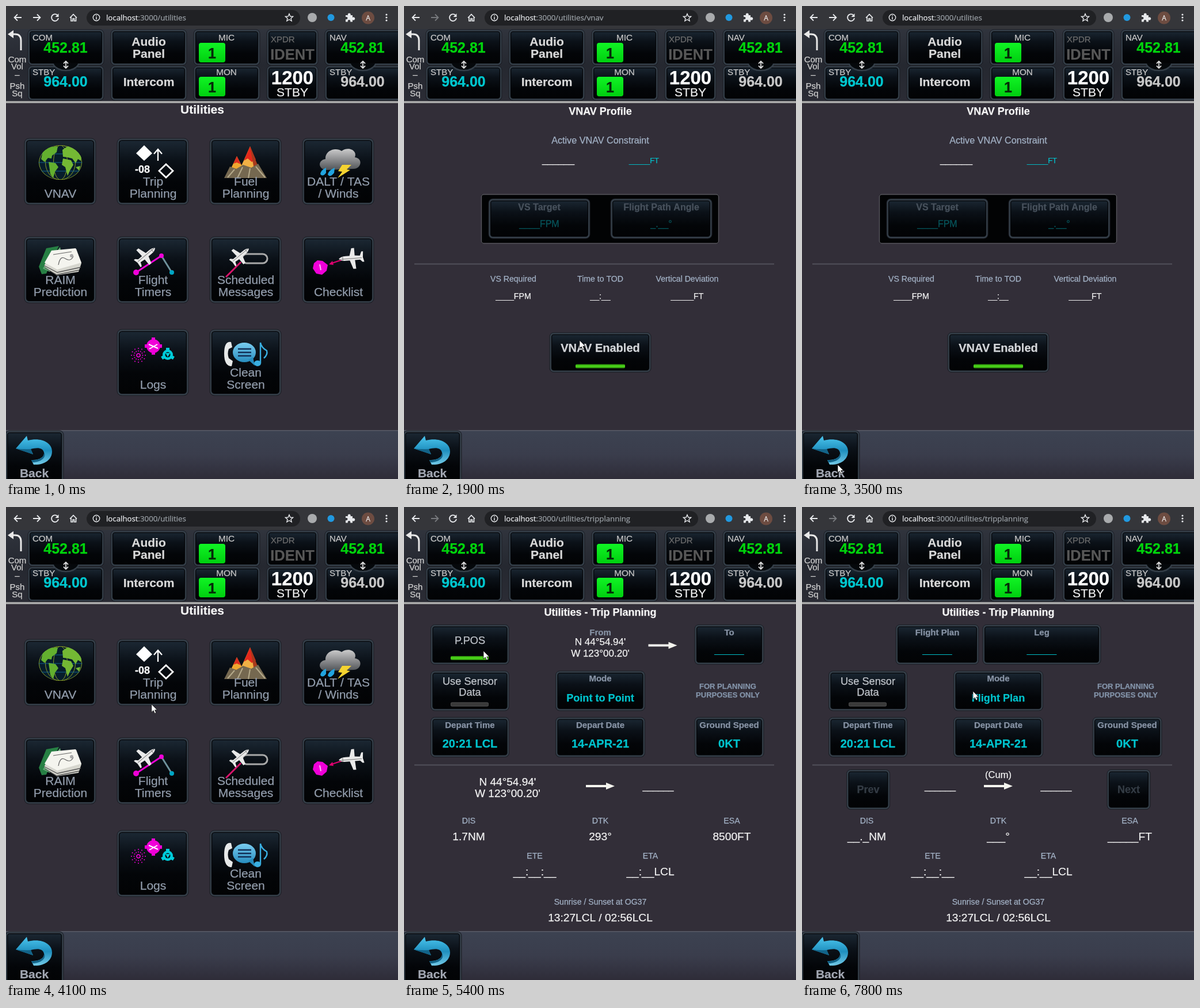
An HTML page with a canvas that plays this animation: 681 by 822 pixels, repeating every 8 s.

```html
<!DOCTYPE html>
<html lang="en">
<head>
<meta charset="utf-8">
<title>Avionics touch panel</title>
<style>
  html, body { margin: 0; width: 100%; height: 100%; overflow: hidden; background: #302c36; }
  canvas { display: block; width: 100%; height: 100%; }
</style>
</head>
<body>
<canvas id="stage" width="681" height="822"></canvas>
<script>
const c = document.getElementById('stage').getContext('2d');
const LOOP = 8000, TICK = 100;
const SANS = '"Liberation Sans", Arial, sans-serif', UI = '"Open Sans", sans-serif';
const CYAN = '#00c3cd', LABEL = '#8793a5', SOFT = '#a3b2c6', WHITE = '#f4f4f4', MAGENTA = '#f000d8';

// ---------- drawing helpers ----------
function text(s, x, y, size, color, weight = '', align = 'center', family = SANS) {
  c.font = `${weight} ${size}px ${family}`;
  c.fillStyle = c.strokeStyle = color;
  c.textAlign = align;
  c.fillText(s, x, y);
  // A hairline gives the glyphs a little more weight.
  c.lineWidth = .25;
  c.strokeText(s, x, y);
}
const bold = (s, x, y, size, color) => text(s, x, y, size, color, 'bold');

function rect(x, y, w, h, fill, r = 0) {
  c.beginPath();
  c.roundRect(x, y, w, h, r);
  c.fillStyle = fill;
  c.fill();
}
function outline(x, y, w, h, color, width, r) {
  c.beginPath();
  c.roundRect(x, y, w, h, r);
  c.strokeStyle = color;
  c.lineWidth = width;
  c.stroke();
}
function shape(d, fill) {
  c.fillStyle = fill;
  c.fill(new Path2D(d));
}
function line(d, color, width = 2) {
  c.strokeStyle = color;
  c.lineWidth = width;
  c.stroke(new Path2D(d));
}
function oval(x, y, rx, ry, fill) {
  c.beginPath();
  c.ellipse(x, y, rx, ry, 0, 0, 7);
  c.fillStyle = fill;
  c.fill();
}
const dot = (x, y, r, fill) => oval(x, y, r, r, fill);

function fade(y0, y1, ...colors) {
  const g = c.createLinearGradient(0, y0, 0, y1);
  colors.forEach((color, i) => g.addColorStop(i / (colors.length - 1), color));
  return g;
}
function button(x, y, w, h, pressed = false, r = 7) {
  const fill = pressed ? fade(y, y + h, '#3f7db4', '#15528f', '#0f4680')
                       : fade(y, y + h, '#1d2a36', '#0b1118', '#030508', '#020304');
  rect(x, y, w, h, fill, r);
  if (!pressed) outline(x + 3.5, y + 3.5, w - 7, h - 7, '#05070a', 1.5, r - 3);
  outline(x + 1.5, y + 1.5, w - 3, h - 3, pressed ? '#f2f4f6' : '#343e48', 2.8, r - 1);
  if (!pressed) outline(x, y, w, h, '#1c1e25', 1, r);
}
function toggleBar(x, y, w, on) {
  rect(x, y, w, 7, on ? fade(y, y + 7, '#2c8a0c', '#50e01c', '#2c8a0c') : '#393939', 2);
  if (!on) outline(x + .5, y + .5, w - 1, 6, '#4b4b4b', 1, 2);
}
function plane(x, y, angle, scale = 1) {
  c.save();
  c.translate(x, y);
  c.rotate(angle);
  c.scale(scale, scale);
  shape('M-22 0Q-18-4-10-4L-3-4 1-17 6-17 6-4 15-3 18-10 21-10 20 0 22 8 19 8 15 4 6 4 7 19 2 19-3 4-10 4Q-18 4-22 0Z', '#e9e9e9');
  line('M-20 1H18M-15-3V3', '#777', 1);
  c.restore();
}

// ---------- browser chrome ----------
function browserBar(path) {
  rect(0, 0, 681, 40, '#35363a');
  rect(140, 7, 371, 27, '#202124', 13.5);
  const ink = '#e8eaed';
  line('M27 20H15M20 14.5 14.5 20 20 25.5', ink, 1.8);
  line('M47 20H59M54 14.5 59.5 20 54 25.5', path ? '#77797d' : ink, 1.8);
  line('M89.5 16A6 6 0 1 0 91 21', ink, 1.8);
  shape('M91.5 13V19H85.5Z', ink);
  line('M111 20.5 117 14.5 123 20.5M113 19V26H116V22H118.5V26H121.5V19', ink, 1.7);
  c.beginPath(); c.arc(157, 20, 5.7, 0, 7); c.lineWidth = 1.4; c.stroke();
  line('M157 19V23.5M157 16.3V17.8', ink, 1.5);
  text('localhost', 174, 25, 13.25, ink, '', 'left', UI);
  const hostWidth = c.measureText('localhost').width;
  text(':3000/utilities' + path, 174 + hostWidth, 25, 13.25, '#9aa0a6', '', 'left', UI);
  line('M492 13.5 493.9 18 498.6 18.4 495 21.5 496.1 26 492 23.5 487.9 26 489 21.5 485.4 18.4 490.1 18Z', ink, 1.4);
  dot(532, 20, 8, '#a9abad');
  dot(564.5, 20, 6, '#2199e0');
  shape('M590 16H594A2.5 2.5 0 1 1 598.5 16H602V20A2.6 2.6 0 1 1 602 24V27.5H598A2.3 2.3 0 1 0 594 27.5H590V23A2.3 2.3 0 1 0 590 19Z', ink);
  dot(629, 20.5, 11, '#6d4c41');
  text('A', 629, 25, 12, '#eee', '', 'center', UI);
  for (const y of [15, 20, 25]) dot(661, y, 1.6, ink);
}

// ---------- radio strip ----------
function radio(x, w, name, standbyColor) {
  const mid = x + 66;
  button(x, 41, w, 62);
  button(x, 104, w, 60);
  shape(`M${mid - 21} 100Q${mid - 17} 112 ${mid} 112T${mid + 21} 100Z`, '#05080b');
  line(`M${mid - 22} 102Q${mid - 15} 112 ${mid} 112Q${mid + 15} 112 ${mid + 22} 102`, '#343e48', 2.5);
  line(`M${mid} 97V107M${mid - 4} 100 ${mid} 96 ${mid + 4} 100M${mid - 4} 104 ${mid} 108 ${mid + 4} 104`, '#ddd', 1.8);
  text(name, x + 8, 60, 15, '#c8c8c8', '', 'left');
  text('STBY', x + 8, 120, 15, '#c8c8c8', '', 'left');
  bold('452.81', mid - .5, 81, 25, '#00d40c');
  bold('964.00', mid - .5, 140, 25, standbyColor);
}
function monitor(name, y, h, labelY, lampY) {
  button(326, y, 115, h);
  text(name, 383, labelY, 15.3, '#c8c8c8');
  rect(335, lampY, 46, 34, fade(lampY, lampY + 34, '#10f424', '#00cf10'), 4);
  bold('1', 358, lampY + 27, 25, '#062a08');
}
function radioStrip() {
  rect(0, 40, 681, 126, fade(40, 166, '#30343d', '#252830', '#2b2c35'));
  line('M26 77V60Q26 49 16 49H10', '#e8e8e8', 3);
  shape('M3 49 13 42V56Z', '#e8e8e8');
  [['Com', 98], ['Vol', 110], ['–', 124], ['Psh', 144], ['Sq', 156.5]]
    .forEach(([s, y]) => text(s, 19.5, y, 15, '#d0d0d0'));
  radio(38, 132, 'COM', '#00c8d0');
  radio(554, 140, 'NAV', '#c8c8c8');
  button(182, 41, 132, 62);
  button(182, 104, 132, 60);
  bold('Audio', 248, 69, 21, '#d8d8d8');
  bold('Panel', 248, 90, 21, '#d8d8d8');
  bold('Intercom', 248, 139, 21, '#d8d8d8');
  monitor('MIC', 41, 62, 60, 64);
  monitor('MON', 104, 60, 120, 123);
  button(453, 41, 89, 62);
  button(453, 104, 89, 60);
  text('XPDR', 460, 63, 15, '#6c6c6c', '', 'left');
  bold('IDENT', 497.5, 93, 25.5, '#575757');
  bold('1200', 497.5, 136, 33, '#fff');
  text('STBY', 497.5, 157, 21, '#f0f0f0');
  rect(0, 165, 681, 4, fade(165, 169, '#777', '#c4c4c4', '#777'));
}

// ---------- utility icons ----------
const icons = {
  VNAV() {
    c.save();
    c.beginPath(); c.ellipse(94.5, 272, 38, 30, 0, 0, 7); c.clip();
    rect(56, 241, 78, 62, '#071d2b');
    for (const r of [12, 26, 37]) {
      c.beginPath(); c.ellipse(94.5, 272, r, 30, 0, 0, 7);
      c.strokeStyle = '#8ea023'; c.lineWidth = 1; c.stroke();
    }
    line('M56 257H134M56 272H134M56 287H134', '#14638a', 1);
    shape('M64 253 75 245 90 244 88 254 80 260 79 265 73 264 67 271 61 266ZM74 271 86 273 91 280 85 288 82 299 77 292Z', '#63b02f');
    shape('M98 250 108 243 122 248 132 259 130 269 125 266 121 273 115 265 107 263 99 262ZM99 265 113 268 117 276 111 286 107 295 103 280 97 276ZM121 280 129 278 127 286Z', '#74b834');
    c.restore();
  },
  'Trip Planning'() {
    shape('M240 242 254 256 240 269 226 256Z', '#fff');
    line('M264 269V250M257 257 264 249 271 257', '#fff', 2.3);
    line('M278 275 290 286.5 278 298 266 286.5Z', '#fff', 2.8);
    bold('-08', 237, 290, 18, '#fff');
  },
  'Fuel Planning'() {
    shape('M424 244 406 284 440 286Z', '#f0b045');
    shape('M424 244 413 269 420 265 427 271 434 267Z', '#e3281b');
    shape('M424 244 431 284 441 286Z', '#a83a1c');
    shape('M401 261 389 286 414 286Z', '#eea72f');
    shape('M401 261 395 274 401 272 408 275Z', '#db2c20');
    shape('M379 299 389 279 400 283 412 276 426 281 438 274 453 299Z', '#756850');
    line('M385 298 397 284M402 299 411 280M421 299 424 282M450 298 434 279', '#b5aa8b', 2);
  },
  'DALT / TAS / Winds'() {
    shape('M557 285C542 284 541 268 555 266C554 250 574 245 583 252C596 243 611 252 606 263C621 265 617 283 604 283Z', fade(246, 286, '#d3d3d3', '#8f9092', '#4c5054'));
    shape('M556 281Q547 285 546 292Q550 298 556 290ZM571 281Q560 286 559 293Q563 299 570 290Z', '#21a4df');
    shape('M584 276 600 276 592 284 598 285 576 299 584 288 577 287Z', '#f5d330');
  },
  'RAIM Prediction'() {
    shape('M57 453 70 421 92 417 85 431 70 465 62 466Z', '#278044');
    shape('M64 456 94 419 96 430 76 462Z', '#67b47a');
    shape('M66 452 78 428 122 422 131 447 126 462 88 468Z', '#d6d6ce');
    line('M67 455 88 467 127 459M66 451 89 463 130 454', '#555', 1.3);
    shape('M67 446 79 425 121 421 131 446 89 458Z', '#f4f4ee');
    line('M82 432 114 427M91 450Q94 433 103 439T117 435', '#666', 1.2);
    dot(114, 434, 3, '#aaa');
  },
  'Flight Timers'() {
    line('M226 463 270 434', MAGENTA, 3);
    line('M270 434 288 463', '#6f929c', 3);
    plane(243, 434, 2.45, .95);
    dot(226, 463, 5, MAGENTA); dot(270, 434, 4, MAGENTA); dot(288, 463, 4, '#00a5c4');
  },
  'Scheduled Messages'() {
    outline(410, 431, 44, 16, '#a9a9a9', 3, 8);
    line('M382 471 408 445', '#d8146c', 3);
    plane(407, 434, 2.45, .88);
  },
  Checklist() {
    shape('M541 442 550 443 559 450 557 460 549 467 539 465 533 456 535 447Z', MAGENTA);
    line('M545 449 547 459', '#ffb6f6', 2);
    line('M584 441 566 447', '#e00070', 2);
    shape('M561 449 567 443 569 450Z', '#e00070');
    plane(600, 438, -.08);
  },
  Logs() {
    for (const r of [3, 7.5, 12])
      for (let i = 0; i < 12; i++) dot(230 + r * Math.cos(i * Math.PI / 6), 607 + r * Math.sin(i * Math.PI / 6), 1, MAGENTA);
    gear(256, 591, 12, 4, MAGENTA);
    line('M248 588 264 595M249 596 263 588', '#fff', 2);
    gear(281, 606, 9, 3, '#00cddb');
    dot(281, 606, 4.5, '#0a0d10');
    shape('M277 603H285L281 610Z', '#00cddb');
  },
  'Clean Screen'() {
    shape('M391 584Q379 582 379 604T392 626L394 617 387 612Q384 604 387 596L393 593Z', '#e7e9e9');
    oval(414, 602, 20, 17, fade(585, 620, '#79ccf0', '#258bbd'));
    shape('M421 615 432 625 429 610Z', '#258bbd');
    line('M403 596H426M403 602H426M403 608H426', '#122e55', 2.4);
    line('M442 621V585Q443 593 453 599Q455 606 448 612', '#39aee0', 2.4);
    oval(437, 621, 6, 5, '#39aee0');
  }
};
function gear(x, y, r, teeth, color) {
  dot(x, y, r, color);
  for (let i = 0; i < teeth; i++) {
    const a = i * 2 * Math.PI / teeth - Math.PI / 2;
    line(`M${x} ${y}L${x + (r + 3) * Math.cos(a)} ${y + (r + 3) * Math.sin(a)}`, color, 6);
  }
}

// ---------- pages ----------
const COLS = [33, 194, 355, 516];
const TILES = [
  [0, 230, 'VNAV'], [1, 230, 'Trip', 'Planning'], [2, 230, 'Fuel', 'Planning'], [3, 230, 'DALT / TAS', '/ Winds'],
  [0, 401, 'RAIM', 'Prediction'], [1, 401, 'Flight', 'Timers'], [2, 401, 'Scheduled', 'Messages'], [3, 401, 'Checklist'],
  [1, 562, 'Logs'], [2, 562, 'Clean', 'Screen']
];
function utilitiesPage(s) {
  bold('Utilities', 341, 187, 21, WHITE);
  for (const [col, y, ...lines] of TILES) {
    const x = COLS[col], name = lines.join(' ');
    button(x - 1, y, 124, 115, s.pressed === name, 8);
    icons[name]();
    lines.forEach((row, i) => text(row, x + 61.5, y + 102.5 - 21 * (lines.length - 1 - i), 21, '#929dac'));
  }
}
function divider() { rect(18, 447.5, 625, 1.8, '#55545e'); }

function vnavPage(s) {
  bold('VNAV Profile', 341, 189, 18, WHITE);
  text('Active VNAV Constraint', 341, 239, 16.2, SOFT);
  text('______', 268, 273, 16.8, WHITE);
  text('_____FT', 417, 273, 13, CYAN);
  rect(134, 327, 413, 86, '#020304', 4);
  outline(134.5, 327.5, 412, 85, '#56555c', 1.4, 4);
  [[147, 'VS Target', '____FPM'], [359, 'Flight Path Angle', '_.__°']].forEach(([x, label, value]) => {
    button(x, 335, 176, 69);
    bold(label, x + 88, 355, 16, '#47515c');
    text(value, x + 88, 384, 16, '#07565c');
  });
  divider();
  [[190, 'VS Required', '____FPM'], [341, 'Time to TOD', '__:__'], [492, 'Vertical Deviation', '_____FT']].forEach(([x, label, value]) => {
    text(label, x, 479, 14.1, SOFT);
    text(value, x, 509, 14.2, WHITE);
  });
  button(253, 567.5, 176, 69, s.pressed === 'VNAV Enabled');
  bold('VNAV Enabled', 341, 601, 20, '#d3d5d9');
  toggleBar(298, 622.5, 86, s.vnavOn);
}

function field(x, y, w, label, value, s, size = 20) {
  button(x, y, w, 69, s.pressed === label);
  bold(label, x + w / 2, y + 18, 15, LABEL);
  if (value) bold(value, x + w / 2, y + 52.5, size, CYAN);
  else text('______', x + w / 2, y + 49, 15.4, CYAN);
}
function toggle(y, lines, on, s) {
  button(46.5, y, 136, 69, s.pressed === lines[0]);
  lines.forEach((row, i) => text(row, 114.5, y + (lines.length > 1 ? 24 + 18.5 * i : 33.5), 18.2, '#c2c6cc'));
  toggleBar(81, y + 54.5, 66, on);
}
function arrow(x, y) {
  rect(x, y - 2, 38, 4, '#f4f4ee');
  shape(`M${x + 35} ${y - 6}L${x + 50} ${y} ${x + 35} ${y + 6}Z`, '#f4f4ee');
}
function position(x, y, size, gap) {
  text("N 44°54.94'", x, y, size, WHITE);
  text("W 123°00.20'", x, y + gap, size, WHITE);
}
function tripPage(s) {
  bold('Utilities - Trip Planning', 341, 189, 18, WHITE);
  if (s.flightPlan) {
    field(163, 204.5, 144, 'Flight Plan', '', s);
    field(314, 204.5, 205, 'Leg', '', s);
  } else {
    toggle(204.5, ['P.POS'], s.pposOn, s);
    if (s.pposOn) {
      bold('From', 341, 222.5, 15, LABEL);
      position(341, 240, 17, 20);
    } else field(281, 204.5, 120, 'From', '', s);
    arrow(424.5, 240.5);
    field(505, 204.5, 120, 'To', '', s);
  }
  toggle(285, ['Use Sensor', 'Data'], s.sensorOn, s);
  field(263.5, 285, 155, 'Mode', s.flightPlan ? 'Flight Plan' : 'Point to Point', s, 18.1);
  bold('FOR PLANNING', 562.5, 316, 13, '#8393a9');
  bold('PURPOSES ONLY', 562.5, 331, 13, '#8393a9');
  field(46.5, 365.5, 136, 'Depart Time', '20:21 LCL', s);
  field(263.5, 365.5, 155, 'Depart Date', '14-APR-21', s);
  if (s.sensorOn) {
    bold('Ground Speed', 565, 384, 15, LABEL);
    bold('0KT', 565, 418, 20, WHITE);
  } else field(505, 365.5, 120, 'Ground Speed', '0KT', s);
  divider();
  if (s.flightPlan) {
    [[77.5, 'Prev'], [530, 'Next']].forEach(([x, label]) => {
      button(x, 456.5, 75, 69);
      bold(label, x + 37.5, 497, 18, '#343c45');
    });
    text('(Cum)', 341, 471, 16.5, WHITE);
  }
  if (s.pposOn) position(180, 484, 19, 20);
  else text('______', 240, 491, 16.2, WHITE);
  arrow(316, 485);
  text('______', 441.5, 491, 16.2, WHITE);
  const [dis, dtk, esa] = s.pposOn ? ['1.7NM', '293°', '8500FT'] : ['__._NM', '___°', '_____FT'];
  [[112.5, 550, 'DIS', dis], [341, 550, 'DTK', dtk], [569.5, 550, 'ESA', esa],
   [227, 610.5, 'ETE', '__:__:__'], [428, 610.5, 'ETA', '__:__LCL']].forEach(([x, y, label, value]) => {
    text(label, x, y, 14.2, SOFT);
    text(value, x, y + 29, 19.2, WHITE);
  });
  text('Sunrise / Sunset at OG37', 341, 691, 14.1, SOFT);
  text('13:27LCL / 02:56LCL', 341, 720, 19.1, WHITE);
}

function footer(s) {
  rect(0, 738, 681, 84, fade(738, 822, '#3c4251', '#3a3d4c', '#2e2c38'));
  rect(0, 737, 681, 1.5, '#595c68');
  button(-1, 738, 101, 92, s.pressed === 'Back');
  shape('M17 769 36 747 38 755C60 749 80 758 80 774C80 789 66 798 48 797L44 789C57 790 67 784 66 776C64 767 54 767 43 770L47 779Z',
    fade(747, 798, '#4cc6ee', '#1f8fbe', '#75cbe8'));
  shape('M17 769 47 779 43 770Q30 771 17 769ZM66 776C67 784 57 790 44 789L46 793C62 793 71 783 66 776Z', '#126388');
  bold('Back', 49, 819, 21, '#a2a7b2');
  if (s.loading) {
    rect(0, 801, 225, 21, '#323237', 2);
    text('Подключение...', 3, 816, 11.3, '#a7a9ad', '', 'left', UI);
  }
}

// ---------- timeline ----------
const CLICKS = [
  [800, 'VNAV'], [2100, 'VNAV Enabled'], [2600, 'VNAV Enabled'], [3400, 'Back'], [4300, 'Trip Planning'],
  [5300, 'P.POS'], [5900, 'P.POS'], [6400, 'Use Sensor'], [7000, 'Use Sensor'], [7700, 'Mode']
];
const POINTER = [
  [200, 130, 806], [700, 95, 304], [1000, 95, 304], [1600, 304, 565], [1700, 304, 565], [1900, 305, 581],
  [2600, 305, 581], [3200, 62, 797], [3500, 62, 797], [4200, 264, 316], [4600, 264, 316], [5100, 138, 250],
  [5900, 138, 250], [6200, 114, 313], [7000, 114, 313], [7500, 297, 320], [8000, 297, 320]
];
function drawPointer(t) {
  const i = POINTER.findIndex(([time]) => time > t);
  if (i < 1) return;
  const [t0, x0, y0] = POINTER[i - 1], [t1, x1, y1] = POINTER[i];
  const u = (t - t0) / (t1 - t0), k = u * u * (3 - 2 * u);
  c.save();
  c.translate(x0 + (x1 - x0) * k, y0 + (y1 - y0) * k);
  const d = 'M0 0V14L3.3 11 5.5 16 8 15 5.8 10.2H10Z';
  shape(d, '#fff');
  line(d, '#111', .8);
  c.restore();
}
function draw(t) {
  const within = (a, b) => t >= a && t < b;
  const state = {
    pressed: CLICKS.find(([time]) => within(time, time + TICK))?.[1],
    vnavOn: !within(2200, 2700),
    pposOn: within(5400, 6000),
    sensorOn: within(6500, 7100),
    flightPlan: t >= 7800,
    loading: within(1000, 1300) || within(4500, 4800)
  };
  rect(0, 0, 681, 822, '#322e38');
  browserBar(within(900, 3500) ? '/vnav' : t >= 4400 ? '/tripplanning' : '');
  radioStrip();
  const page = within(900, 3600) ? vnavPage : t >= 4400 ? tripPage : utilitiesPage;
  page(state);
  footer(state);
  drawPointer(t);
}
const start = performance.now();
function tick() {
  const t = (performance.now() - start) % LOOP;
  draw(Math.floor(t / TICK) * TICK);
  requestAnimationFrame(tick);
}
tick();
</script>
</body>
</html>
```
